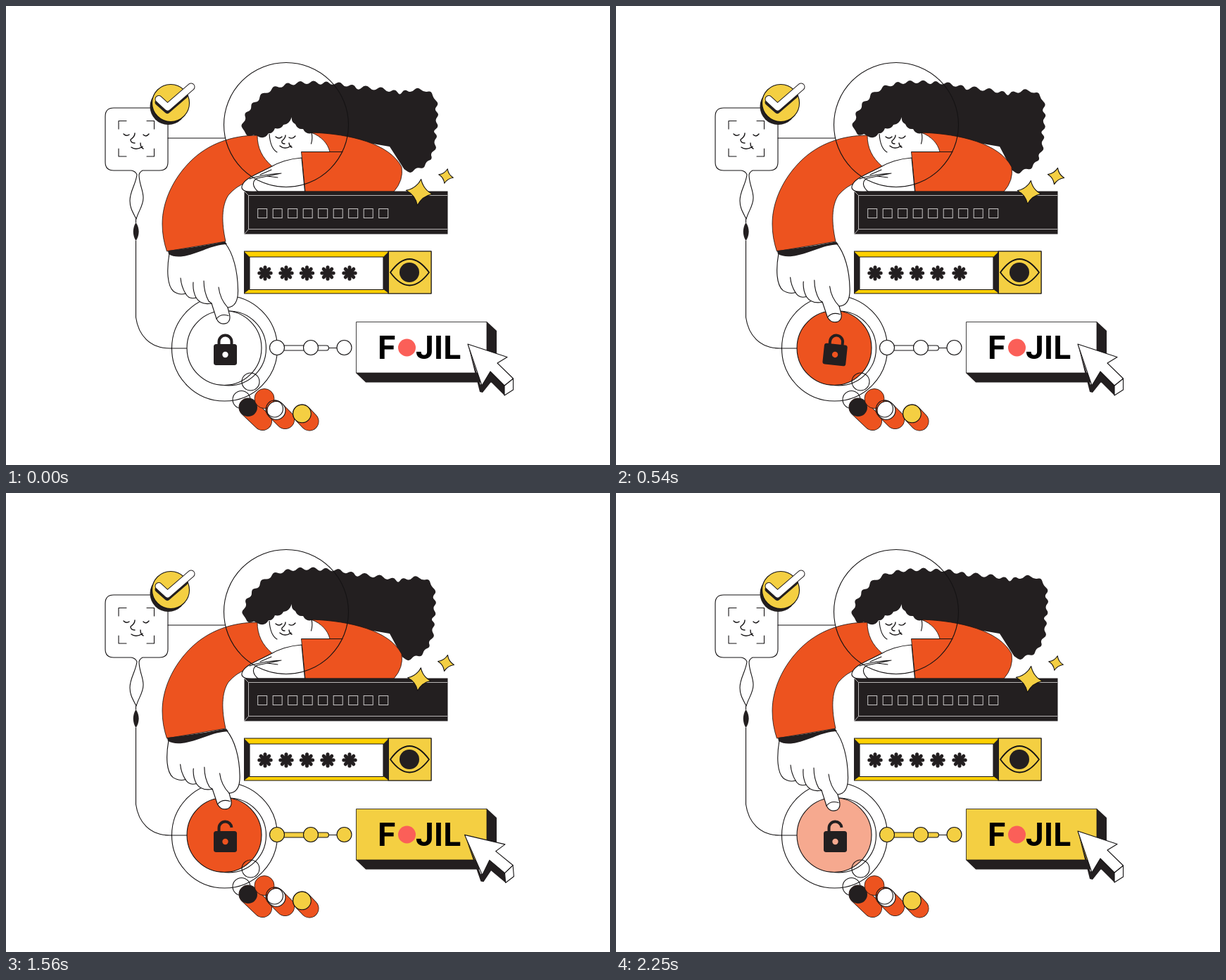
Write an HTML page that moves like this. It is 858 px wide and 653 px high and loops after 2280 ms.

```html
<!DOCTYPE html>
<html lang="en">
<head>
<meta charset="utf-8">
<title>Secure sign-in</title>
<style>
html,body{margin:0;width:100%;height:100%;overflow:hidden;background:#fff}
svg{display:block;width:100vw;height:100vh}
.l{fill:none;stroke:#151314;stroke-width:1.1;stroke-linecap:round;stroke-linejoin:round}
.b{stroke-width:1.4}
.w{fill:#fff;stroke:#151314;stroke-width:1.1;stroke-linejoin:round}
.y{fill:#f4cf42;stroke:#151314;stroke-width:1.1;stroke-linejoin:round}
.o{fill:#ed531f;stroke:#151314;stroke-width:.8;stroke-linejoin:round}
.k{fill:#231f20}
text{font:700 46px Roboto,"Liberation Sans",sans-serif;fill:#000}
</style>
</head>
<body>
<svg viewBox="0 0 858 653" xmlns="http://www.w3.org/2000/svg">
  <rect width="858" height="653" fill="#fff"/>

  <!-- face scan card -->
  <path class="l" d="M230 188H311M184.500 303V308M184.500 334V443C188 468 204 487 233 487H257"/>
  <path class="l" d="M178 234H153Q141 234 141 222V157Q141 145 153 145H218Q230 145 230 157V222Q230 234 218 234H194Q190 236 189 240C189 254 195 261 195 273C195 284 188 292 185 303C180 293 176 287 176 277C176 263 184 255 186 240Q184 235 178 234Z"/>
  <path class="k" d="M184.500 308C190 316 190 326 184.500 334C179.500 326 179.500 316 184.500 308Z"/>
  <path class="l" d="M160 175V163.500H171M200 163.500H210.500V175M210.500 203V214H200M171 214H160V203"/>
  <path class="l b" d="M167 182Q171 186 175 183M195 183Q199 187 203 182M183 181Q183 186 177 190Q177 195 183 195M178 201Q185 206 194 200M191 195Q191 201 195 203"/>
  <circle class="k" cx="230.500" cy="143" r="26"/>
  <circle class="y" cx="234" cy="138" r="26.500"/>
  <g fill="none" stroke-linecap="round" stroke-linejoin="round">
    <path d="M216 137L229 148.500L254 127" stroke="#231f20" stroke-width="9"/>
    <path d="M217 132.500L229.500 144L263 115" stroke="#231f20" stroke-width="11"/>
    <path d="M217 132.500L229.500 144L263 115" stroke="#fff" stroke-width="9"/>
  </g>

  <!-- woman -->
  <path fill="#fff" d="M358 185L406 156L434 180Q456 190 460 207L425 264H360L345 215Z"/>
  <path id="hair" class="k"/>
  <path class="o" d="M434 180C490 182 545 196 562 229Q565 248 551 264H425L419.500 207.500H460C457 195 448 186 434 180Z"/>
  <path class="o" d="M357 184C321 184 287 196 262 221C236 247 222 280 222 310Q222 330 228.500 349L312 335C306 308 306 284 316 269Q327 256 342 251L378 228C364 216 357 202 357 184Z"/>
  <path class="w" d="M335 257C337 246 355 240 374 230Q394 218 420 216L424.500 264H358C344 266 334 263 335 257Z"/>
  <path class="l" d="M420 207.500H478M346 246Q362 240 391 238M371 242L386 244M358 264C350 257 349 249 357 245L391 238M361 240L377 233"/>
  <path class="l" d="M374 182C375 196 378 204 385 208M434 180Q436 188 433.500 196"/>
  <path class="l b" d="M383 186Q388 190 392 186M402 187Q407 190 411 185M397 184Q397 188 392 192Q391 196 396 196M389 199Q396 205 405 199M402 195Q403 200 406 201"/>
  <circle class="l" cx="398" cy="169" r="88.500"/>

  <!-- code box -->
  <rect class="k" x="338.500" y="263.500" width="289" height="61"/>
  <path d="M339 264L344.500 269.500H627M344.500 269.500V317.500H627M344.500 317.500L339 324" fill="none" stroke="#c9c7c7" stroke-width=".9"/>
  <g id="boxes" fill="none" stroke="#c9c7c7"></g>
  <g id="stars" class="y"><path id="big"/><path id="small"/></g>

  <!-- password box -->
  <rect x="338.500" y="349" width="265.500" height="60" fill="#ffd000" stroke="#151314"/>
  <rect class="y" x="543" y="349" width="61" height="60"/>
  <rect class="w" x="346" y="357" width="190" height="46.500"/>
  <path class="k" d="M338 349L346 357V403L338 409ZM544 349L536 357V403L544 409Z"/>
  <g id="marks" stroke="#231f20" stroke-width="5" stroke-linecap="round"></g>
  <path class="l" style="stroke-width:1.8" d="M546 379Q573 341 601 379Q573 416 546 379Z"/>
  <circle class="k" cx="573" cy="379" r="14"/>

  <!-- lock dial -->
  <circle class="w" cx="310.500" cy="487" r="75"/>
  <circle class="w" cx="316.500" cy="487" r="53"/>
  <path class="l" d="M235 487H258"/>
  <circle id="dial" class="w" cx="310" cy="486.500" r="53"/>
  <g id="lock">
    <path id="bow" d="M302.500 483V477.500A9 9 0 0 1 320.500 477.500V483" fill="none" stroke="#231f20" stroke-width="4"/>
    <rect class="k" x="295" y="481" width="33" height="30" rx="3.500"/>
    <circle id="hole" cx="311.500" cy="496" r="4.200"/>
  </g>
  <g id="hand">
    <path class="w" d="M232 352C228 376 229 398 238 406Q247 412 255 409Q260 418 270 415Q277 426 292 423L299 445Q304 455 314 451Q320 447 317 437L315 429C326 428 330 417 329.500 403C329 377 323 352 311 337Z"/>
    <path class="l" d="M248 387Q249 399 255 409M266 393Q265 405 270 415M281 391Q281 407 288 420L292 423M302 400Q304 417 315 429M299 445Q305 437 316 440.500"/>
    <path class="k" d="M230 348C258 345 286 340 311 335L314 339C290 340 276 352 252 356Q239 358 231 353Z"/>
  </g>

  <!-- beads -->
  <circle class="l" cx="347.500" cy="534.500" r="12.500"/>
  <circle class="l" cx="334.500" cy="560" r="12.500"/>
  <g id="pills"></g>
  <circle class="k" cx="344" cy="571" r="13"/>
  <circle class="o" cx="367" cy="558.500" r="14"/>
  <circle class="w" cx="384" cy="575.500" r="13"/>
  <circle class="l" cx="381.500" cy="573" r="12"/>
  <circle class="y" cx="420.500" cy="580" r="12.800"/>

  <!-- progress chain -->
  <path class="l" d="M458 486.500H471"/>
  <path id="bar" class="w" d="M390 483H455Q458.500 483 458.500 486.500T455 490H390Z"/>
  <circle id="n0" class="w" cx="385" cy="486" r="10.500"/>
  <circle id="n1" class="w" cx="433" cy="486" r="10.500"/>
  <circle id="n2" class="w" cx="480.500" cy="486" r="10.500"/>

  <!-- button -->
  <path class="k" d="M683 449L697 462V535.500H511L497 522Z"/>
  <rect id="face" class="w" x="497.500" y="449.500" width="185.500" height="72.500" style="stroke-width:.8"/>
  <text x="528" y="502">F</text>
  <circle cx="569.500" cy="486" r="12.500" fill="#fb5f58"/>
  <text x="582" y="502">JIL</text>
  <g id="arrow">
    <path class="k" d="M656 481L673 549L677 550L689 535L708 554V540L688 519L674 539Z"/>
    <path class="w" d="M708 540L720.500 530V546L708 554Z"/>
    <path class="w" d="M656 481L712 499.500L698 508L720.500 530L708 540L688 520L676 540Z"/>
  </g>
</svg>
<script>
const LOOP = 2280, STEP = 30, TAU = Math.PI * 2;
const $ = id => document.getElementById(id);
const ramp = (t, a, b) => Math.min(1, Math.max(0, (t - a) / (b - a)));
const ease = (t, a, b) => { const p = ramp(t, a, b); return p * p * (3 - 2 * p); };
const mix = (rgb, p) => `rgb(${rgb.map(c => Math.round(255 + (c - 255) * p))})`;
const ORANGE = [237, 83, 31], YELLOW = [244, 207, 66];

// Dips between the curls, clockwise from the left temple
const dips = [[352,183],[340,178],[342,162],[349,148],[360,136],[375,124],[392,117],
  [409,114],[427,113],[446,114],[463,114],[481,117],[499,122],[521,123],[541,125],
  [558,129],[574,125],[592,124],[605,132],[606,148],[607,163],[604,179],[605,194],
  [601,210],[595,222],[581,230],[564,233]];
const FRINGE = "L545 200L434 181Q426 183 422 175Q414 176 411 168Q405 165 406 158" +
  "Q402 169 394 169Q391 176 382 174Q379 182 373 181Q367 191 357 185Z";

// Smooth wave: dips and the crests between them steer a curve through their midpoints
function hairPath(t) {
  const a = TAU * t / 1140;
  const pts = dips.map(([x, y]) => [
    x + 1.9 * Math.cos(a) * (x - 400) / 210,
    y + .8 * (Math.cos(a + x / 60) - .3)]);
  const ctrl = [];
  pts.forEach(([x, y], i) => {
    ctrl.push([x, y]);
    if (i + 1 === pts.length) return;
    const [u, v] = pts[i + 1];
    ctrl.push([(x + u) / 2 + (v - y) * .5, (y + v) / 2 - (u - x) * .5]);
  });
  let d = `M${ctrl[0]}`;
  for (let i = 1; i < ctrl.length - 1; i++) {
    const [x, y] = ctrl[i], [u, v] = ctrl[i + 1];
    d += `Q${x} ${y} ${(x + u) / 2} ${(y + v) / 2}`;
  }
  return d + `L${ctrl[ctrl.length - 1]}` + FRINGE;
}

function starPath(cx, cy, r, turn) {
  const at = (k, q) => {
    const a = turn + k * TAU / 8;
    return `${cx + q * Math.cos(a)} ${cy + q * Math.sin(a)}`;
  };
  let d = `M${at(0, r)}`;
  for (let k = 1; k < 8; k += 2) d += `Q${at(k, r * .37)} ${at(k + 1, r)}`;
  return d + "Z";
}

let html = "";
for (let i = 0; i < 9; i++) html += `<rect x="${357.7 + i * 21.5}" y="288.500" width="13" height="13"/>`;
$("boxes").innerHTML = html;

html = "";
for (const x of [368, 398, 427.5, 457, 488])
  for (let k = 0; k < 4; k++) {
    const c = 8.2 * Math.cos(k * TAU / 8), s = 8.2 * Math.sin(k * TAU / 8);
    html += `<path d="M${x - c} ${380 - s}L${x + c} ${380 + s}"/>`;
  }
$("marks").innerHTML = html;

html = "";
for (const [a, b, c, d] of [[344,571,364.5,590.5], [382,574,396.5,588.5], [420.5,580,431,591]])
  for (const [col, w] of [["#151314", 27], ["#ed531f", 25.6]])
    html += `<path d="M${a} ${b}L${c} ${d}" stroke="${col}" stroke-width="${w}" stroke-linecap="round"/>`;
$("pills").innerHTML = html;

function draw(t) {
  $("hair").setAttribute("d", hairPath(t));
  const pulse = (.5 + .5 * Math.cos(TAU * t / LOOP)) ** 3;
  $("big").setAttribute("d", starPath(587, 265, 16.4 + 2.4 * pulse, -1.43));
  $("small").setAttribute("d", starPath(625, 242, 11.2 - .7 * Math.cos(TAU * t / 1140), -1.36));

  const press = ease(t, 0, 480) - ease(t, 1860, 2220);
  $("hand").setAttribute("transform",
    `translate(${270 + press * .4} 345) scale(${1 + .037 * press} ${1 - .022 * press}) translate(-270 -345)`);

  const red = mix(ORANGE, ramp(t, 300, 480) - ramp(t, 2130, 2370));
  $("dial").style.fill = red;
  $("hole").style.fill = red;

  const shake = t > 480 && t < 720 ? 6 * Math.sin(TAU * (t - 480) / 240) : 0;
  $("lock").setAttribute("transform", `rotate(${shake} 311.5 492)`);
  const open = ease(t, 720, 840);
  $("bow").setAttribute("stroke-dasharray", `${42 - 9 * open} 60`);
  $("bow").setAttribute("transform", `translate(0 ${-open})`);

  const glow = (id, a, b) => $(id).style.fill = mix(YELLOW, ramp(t, a, b));
  glow("n0", 690, 780);
  glow("bar", 750, 840);
  glow("n1", 810, 900);
  glow("n2", 960, 1050);
  glow("face", 1100, 1200);

  const click = ease(t, 1090, 1230) - ease(t, 1680, 2080);
  $("arrow").setAttribute("transform", `rotate(${-5 * click} 715 535)`);
}

function tick() {
  draw(Math.floor(performance.now() % LOOP / STEP) * STEP);
  requestAnimationFrame(tick);
}
draw(0);
requestAnimationFrame(tick);
</script>
</body>
</html>
```
